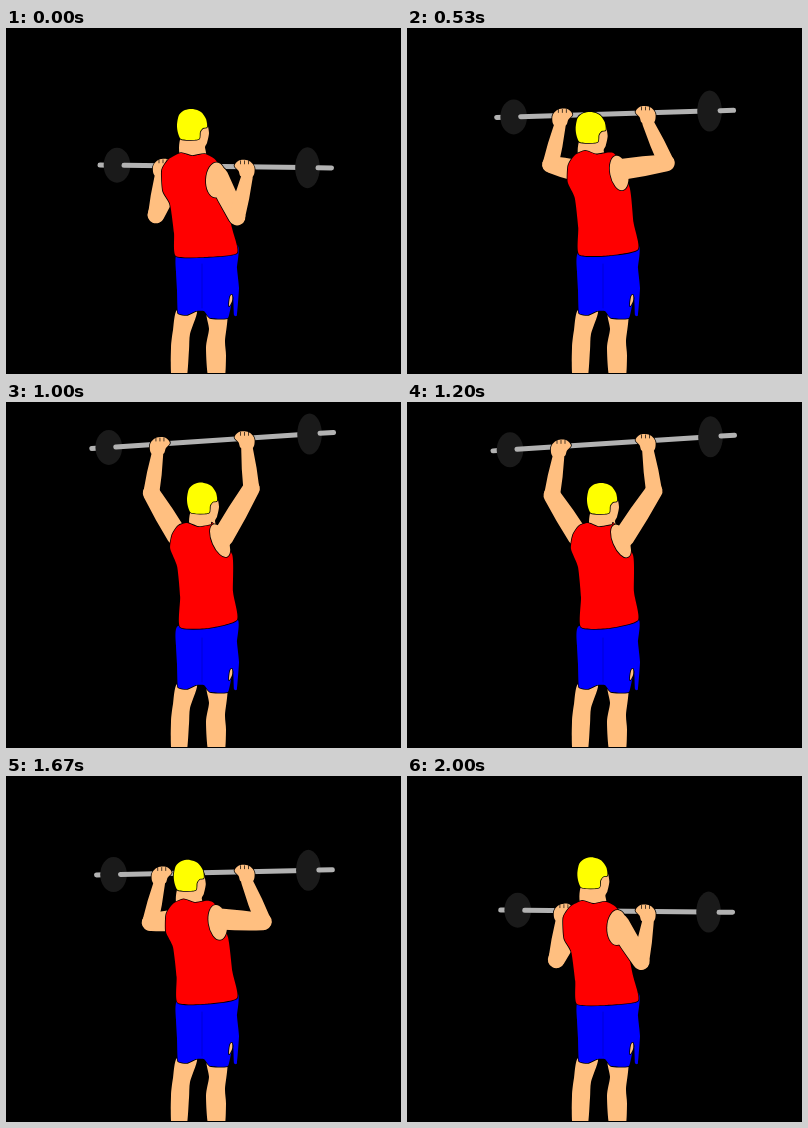
These frames come from a looping animation (395x346 px, 2070 ms). An HTML page with a canvas:

```html
<!DOCTYPE html>
<html lang="en">
<head>
<meta charset="utf-8">
<title>Overhead press</title>
<style>
  html, body { margin: 0; width: 100%; height: 100%; overflow: hidden; background: #000; }
  canvas { display: block; }
</style>
</head>
<body>
<canvas id="stage" width="395" height="346"></canvas>
<script>
const ctx = document.getElementById('stage').getContext('2d');
const LOOP = 2070, STEPS = 31, STEP_MS = 200 / 3;
const SKIN = '#ffbf80', RED = '#ff0000', BLUE = '#0000ff', HAIR = '#ffff00';
const STEEL = '#b2b2b2', IRON = '#1a1a1a';

// Lift over one loop as [step, height]: 0 is the bar at the shoulders, 1 near lockout.
const LIFT = [[0, 0], [4, 0.21], [8, 0.54], [12, 0.926], [18, 1], [25, 0.432], [30, 0.034]];

const mix = (a, b, u) => a + (b - a) * u;

function liftAt(step) {
  const n = LIFT.length, first = LIFT.findLastIndex(([s]) => s <= step);
  const [[s0, a], [s1, b], [s2, c], [s3, d]] = [-1, 0, 1, 2].map(o => {
    const i = first + o, lap = Math.floor(i / n), [s, h] = LIFT[i - lap * n];
    return [s + lap * STEPS, h];
  });
  // Cubic Hermite, seamless across the loop.
  const span = s2 - s1, t = (step - s1) / span;
  const m = (c - a) / (s2 - s0) * span, k = (d - b) / (s3 - s1) * span;
  return b + t * (m + t * (3 * (c - b) - 2 * m - k + t * (2 * (b - c) + m + k)));
}

// Fills shapes as one body with a thin dark outline around the whole.
function paint(fill, ...paths) {
  ctx.strokeStyle = '#000';
  ctx.lineWidth = 1.6;
  ctx.fillStyle = fill;
  paths.forEach(p => ctx.stroke(p));
  paths.forEach(p => ctx.fill(p));
}

// Closed curve through a flat list of points.
function blob(pts, round = 1) {
  const n = pts.length, k = round / 6, path = new Path2D();
  const at = (i, axis) => pts[(i * 2 + axis + n) % n];
  const handle = (i, dir, axis) => at(i, axis) + dir * k * (at(i + 1, axis) - at(i - 1, axis));
  path.moveTo(pts[0], pts[1]);
  for (let i = 0; i < n / 2; i++) {
    path.bezierCurveTo(handle(i, 1, 0), handle(i, 1, 1),
      handle(i + 1, -1, 0), handle(i + 1, -1, 1), at(i + 1, 0), at(i + 1, 1));
  }
  path.closePath();
  return path;
}

function oval(x, y, rx, ry, turn = 0) {
  const path = new Path2D();
  path.ellipse(x, y, rx, ry, turn, 0, 2 * Math.PI);
  return path;
}

// Tapered limb between two round joints, slightly swollen in the middle.
function limb([ax, ay], ra, [bx, by], rb, swell = 1) {
  const path = new Path2D(), dir = Math.atan2(by - ay, bx - ax), q = Math.PI / 2;
  const r = (ra + rb) / 2 + swell, nx = -Math.sin(dir) * r, ny = Math.cos(dir) * r;
  const mx = (ax + bx) / 2, my = (ay + by) / 2;
  path.arc(ax, ay, ra, dir + q, dir + 3 * q);
  path.quadraticCurveTo(mx - nx, my - ny, bx + rb * Math.sin(dir), by - rb * Math.cos(dir));
  path.arc(bx, by, rb, dir - q, dir + q);
  path.quadraticCurveTo(mx + nx, my + ny, ax - ra * Math.sin(dir), ay + ra * Math.cos(dir));
  return path;
}

function line(x1, y1, x2, y2, color, width) {
  ctx.beginPath();
  ctx.moveTo(x1, y1);
  ctx.lineTo(x2, y2);
  ctx.strokeStyle = color;
  ctx.lineWidth = width;
  ctx.stroke();
}

function barbell(x1, x2, y) {
  const rod = (a, b) => line(a, y(a), b, y(b), STEEL, 5);
  const plate = (x, rx, ry) => {
    ctx.fillStyle = IRON;
    ctx.fill(oval(x, y(x), rx, ry));
  };
  ctx.lineCap = 'round';
  rod(x1 + 2, x1 + 10);
  plate(x1 + 19, 13.3, 17.5);
  rod(x1 + 26, x2 - 30);
  plate(x2 - 26.5, 12.3, 20.5);
  rod(x2 - 16, x2 - 2.5);
}

function legs() {
  paint(SKIN,
    blob([171,282, 167,302, 165,320, 166,352, 180,352, 183,322, 184,306, 191,282], 0.7),
    blob([201,284, 203,301, 200,320, 203,352, 218,352, 220,328, 219,313, 221,284], 0.7));
  ctx.fillStyle = '#000';
  ctx.fillRect(0, 345, 395, 1);
}

function shorts() {
  paint(BLUE, blob([172,224, 170,243, 171,262, 172,285, 181,287, 190,283, 198,283, 204,290,
    222,290, 227,268, 228,287, 231,287, 233,260, 231,240, 231,217], 0.4));
  paint(SKIN, blob([224,269, 226,267, 226,273, 223,278]));
  line(196, 236, 196, 280, '#0000c0', 0.7);
}

function head(u) {
  ctx.save();
  ctx.translate(171 - 20 * u + 29 * u * u, 81 + 12 * u * (1 - u));
  paint(SKIN, blob([25,10, 30,14, 32,24, 30,34, 28,38, 28,48, 4,48, 4,28], 0.7));
  paint(HAIR, blob([0,16, 2,6, 8,1, 16,0, 24,3, 29,10, 30,18, 26,19, 23,23, 22,30, 13,31, 4,30, 1,24], 0.8));
  ctx.restore();
}

function shirt(u) {
  const low = [175,125, 186,128, 199,126, 211,134, 219,168, 226,200, 231,225,
    200,229, 170,228, 168,205, 164,176, 157,163, 156,142, 163,131];
  const high = [181,121, 192,125, 205,123, 207,122, 226,153, 227,190, 231,218,
    203,226, 174,225, 174,195, 171,165, 164,147, 166,133, 172,124];
  paint(RED, blob(low.map((v, i) => mix(v, high[i], u)), 0.6));
}

// side is 1 for the left arm, -1 for the mirrored right one.
function arm(side, grip, elbow, shoulder, ...extra) {
  const [x, y] = grip, wrist = [x - 2.5 * side, y + 10];
  const fist = [-10,1, -6,-5, 0,-7, 6,-6, 10,-1, 6,4, 3,10, -8,10]
    .map((v, i) => i % 2 ? y + v : x + side * v);
  paint(SKIN, ...extra, limb(shoulder, 10.5, elbow, 8.5), limb(wrist, 5.8, elbow, 8), blob(fist));
  for (const dx of [-4, 0, 4]) line(x + dx, y - 6, x + dx, y - 3, '#000', 0.7);
}

function draw(step) {
  const u = liftAt(step);
  const x1 = 92 - 8 * u, x2 = 328 + 2 * u;
  const barY = x => mix(137 - 88 * u, 140 - 107 * u, (x - x1) / (x2 - x1));
  const gripAt = x => [x, barY(x)];
  const left = gripAt(157 - 3 * u), right = gripAt(238.5);

  ctx.fillStyle = '#000';
  ctx.fillRect(0, 0, 395, 346);
  barbell(x1, x2, barY);
  legs();
  shorts();
  // The elbows hang a fixed drop below the bar and swing out halfway up.
  arm(1, left, [150 - 20 * u + 15 * u * u, left[1] + 49], [165 + 6 * u, 152 - 18 * u]);
  head(u);
  shirt(u);
  arm(-1, right, [231 + 95 * u - 79 * u * u, right[1] + 50], [212 + 5 * u, 149 - 14 * u],
    oval(210 + 4 * u, 152 - 13 * u, 10 - 2 * u, 17.5, 0.05 - 0.45 * u));
}

const start = performance.now();
function tick() {
  const t = (performance.now() - start) % LOOP;
  // Steps fall on whole hundredths of a second.
  draw(Math.floor((Math.floor(t / 10) * 10 + 3.4) / STEP_MS));
  requestAnimationFrame(tick);
}
tick();
</script>
</body>
</html>
```
